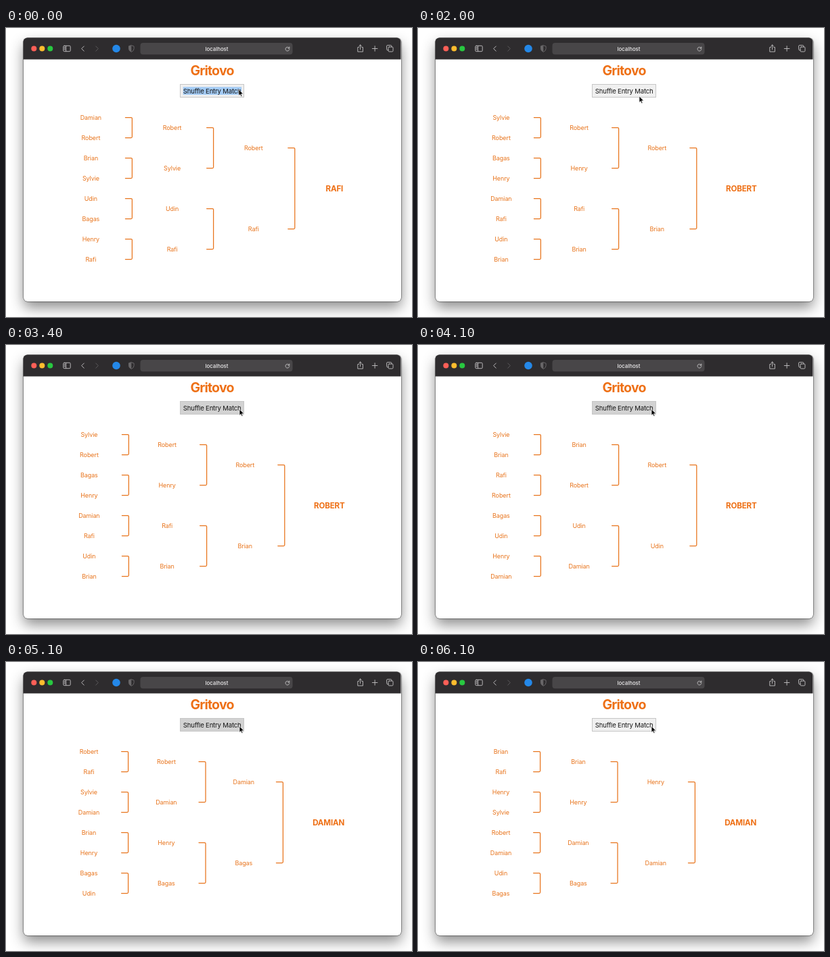
Animation, 600 px wide and 428 px high, one loop 6.2 s. Source, as an HTML page:

```html
<!DOCTYPE html>
<html lang="en">
<head>
<meta charset="utf-8">
<title>Tournament bracket</title>
<style>
  html, body { margin: 0; width: 100%; height: 100%; overflow: hidden; background: #fff; }
  #window {
    position: absolute; left: 25.5px; top: 14.5px; width: 558px; height: 390.5px;
    border-radius: 6px; background: #fff;
    box-shadow: 0 0 1px 0.5px rgba(0,0,0,.65), 0 9px 20px rgba(0,0,0,.46);
  }
  svg { position: absolute; left: 0; top: 0; display: block; }
  text { font-family: Inter, "Open Sans", sans-serif; text-anchor: middle; }
  .line { fill: none; stroke-linecap: round; stroke-linejoin: round; }
  #bracket text { fill: #e8741c; font-size: 9px; letter-spacing: -.1px; }
  #bracket path { stroke: #e8741c; stroke-width: 1.25; }
  #bracket .champion { fill: #ee7016; font-size: 11.6px; font-weight: 700; letter-spacing: -.2px; }
</style>
</head>
<body>
<div id="window"></div>
<svg width="600" height="428" viewBox="0 0 600 428">
  <path d="M25.5 46.5V20.5a6 6 0 0 1 6-6H577.5a6 6 0 0 1 6 6V46.5Z" fill="#2e2c2e"/>
  <circle cx="41.3" cy="30.5" r="4" fill="#fe5f57"/>
  <circle cx="53.3" cy="30.5" r="4" fill="#febc2e"/>
  <circle cx="65.3" cy="30.5" r="4" fill="#28c840"/>
  <g class="line" stroke="#b9b7b9" stroke-width="1">
    <rect x="84.8" y="26.3" width="10.4" height="8.4" rx="1.4"/>
    <path d="M88.6 26.5v8M86.2 28.5h1M86.2 30.2h1M86.2 31.9h1"/>
    <path d="M115.3 27l-3.6 3.6 3.6 3.6"/>
    <path d="M132.7 27l3.6 3.6-3.6 3.6" stroke="#5c5a5c"/>
    <path d="M185.3 25.8l3.8 1.3v3.6q0 3-3.8 4.8q-3.8-1.8-3.8-4.8v-3.6Z" stroke="#686668"/>
  </g>
  <path d="M185.3 25.8v9.7q-3.8-1.8-3.8-4.8v-3.6Z" fill="#686668"/>
  <circle cx="163" cy="30.5" r="5.8" fill="#2488e8"/>
  <rect x="198.5" y="22" width="225" height="17.2" rx="4" fill="#484648"/>
  <text x="311.5" y="33.6" font-size="7.8" font-weight="500" fill="#f0eff0">localhost</text>
  <g class="line" stroke="#c5c3c5" stroke-width=".9">
    <path d="M418.6 30a2.9 2.9 0 1 0 .2 1.7M418.8 28v2.1h-2.1"/>
    <path d="M521.4 28.5h-1.6v6.6h7.6v-6.6h-1.6M523.6 31.8v-6.6M521.6 27l2-2 2 2"/>
    <path d="M541.3 30.5h7.6M545.1 26.7v7.6"/>
    <rect x="565" y="28" width="7" height="7" rx="1.3"/>
    <path d="M565 32.8h-1.2a1.2 1.2 0 0 1-1.2-1.2v-4.8a1.2 1.2 0 0 1 1.2-1.2h4.8a1.2 1.2 0 0 1 1.2 1.2v1.2"/>
  </g>

  <text x="304.5" y="70" font-size="19.5" font-weight="700" letter-spacing="-.8" fill="#ee7016">Gritovo</text>
  <rect id="button" x="257.5" y="83.5" width="94" height="19" stroke="#c6c6c6"/>
  <rect id="selection" x="261.7" y="87.3" width="86.4" height="11.6" fill="#a3cbf5"/>
  <text x="304.7" y="96.6" font-size="9.6" letter-spacing="-.2" fill="#161616">Shuffle Entry Match</text>
  <g id="bracket"></g>
  <path id="cursor" d="M0 0V9.3L2.1 7.4L3.5 10.6L5 10L3.6 6.8H6.6Z" fill="#000" stroke="#fff" stroke-width=".7"/>
</svg>

<script>
const LOOP = 6200, STEP = 100;
const $ = id => document.getElementById(id);

const players = {
  D: "Damian", R: "Robert", B: "Brian", S: "Sylvie",
  U: "Udin", G: "Bagas", H: "Henry", F: "Rafi"
};

// start time, column width, then the players left in each round
const draws = [
  [0,    120.2, "DRBSUGHF RSUF RF F"],
  [2000, 115.2, "SRGHDFUB RHFB RB R"],
  [3600, 115.2, "SBFRGUHD BRUD RU R"],
  [4200, 114.4, "RFSDBHGU RDHG DG D"],
  [5200, 120.2, "USFGBHDR UFHR UR U"],
  [5700, 114.4, "BFHSRDUG BHDG HD D"]
];

const presses = [[1900, 2000], [3400, 3600], [4000, 4200], [4600, 5200], [5500, 5700]];

// time, x, y of the pointer tip
const route = [
  [0, 344, 91], [300, 318, 95], [1900, 318, 95], [2500, 439, 177],
  [2700, 439, 177], [3200, 345, 95], [LOOP, 345, 95]
];

function label(x, y, text, cls = "") {
  return `<text class="${cls}" x="${x}" y="${y}">${text}</text>`;
}

function bracketSvg(width, rounds) {
  let out = "";
  rounds.split(" ").forEach((round, k) => {
    const span = 30 * 2 ** k;
    [...round].forEach((key, i) => {
      const y = 132.5 + i * span + (span - 30) / 2;
      if (k === 3) {
        out += label(305 + 1.5 * width, y + 4.2, players[key].toUpperCase(), "champion");
        return;
      }
      out += label(65.3 + width * (k + .5), y + 3.3, players[key]);
      if (i % 2 === 0) {
        const x = 66.2 + width * (k + 1);
        out += `<path class="line" d="M${x - 10} ${y}h8.5q1.5 0 1.5 1.5v${span - 3}q0 1.5-1.5 1.5h-8.5"/>`;
      }
    });
  });
  return out;
}

function pointerAt(t) {
  const n = route.findIndex(p => p[0] > t);
  const [t0, x0, y0] = route[n - 1], [t1, x1, y1] = route[n];
  const u = (t - t0) / (t1 - t0), e = u * u * (3 - 2 * u);
  return [x0 + (x1 - x0) * e, y0 + (y1 - y0) * e];
}

let shown;
function render(now) {
  const t = Math.floor(now % LOOP / STEP) * STEP;
  const draw = draws.filter(d => d[0] <= t).pop();
  if (draw !== shown) {
    $("bracket").innerHTML = bracketSvg(draw[1], draw[2]);
    shown = draw;
  }
  const pressed = presses.some(([a, b]) => t >= a && t < b);
  $("button").setAttribute("fill", pressed ? "#d2d2d2" : "#f0f0f0");
  $("selection").setAttribute("visibility", t < 1900 ? "visible" : "hidden");
  $("cursor").setAttribute("transform", `translate(${pointerAt(t)})`);
}

const start = performance.now();
function tick() {
  render(performance.now() - start);
  requestAnimationFrame(tick);
}
tick();
</script>
</body>
</html>
```
